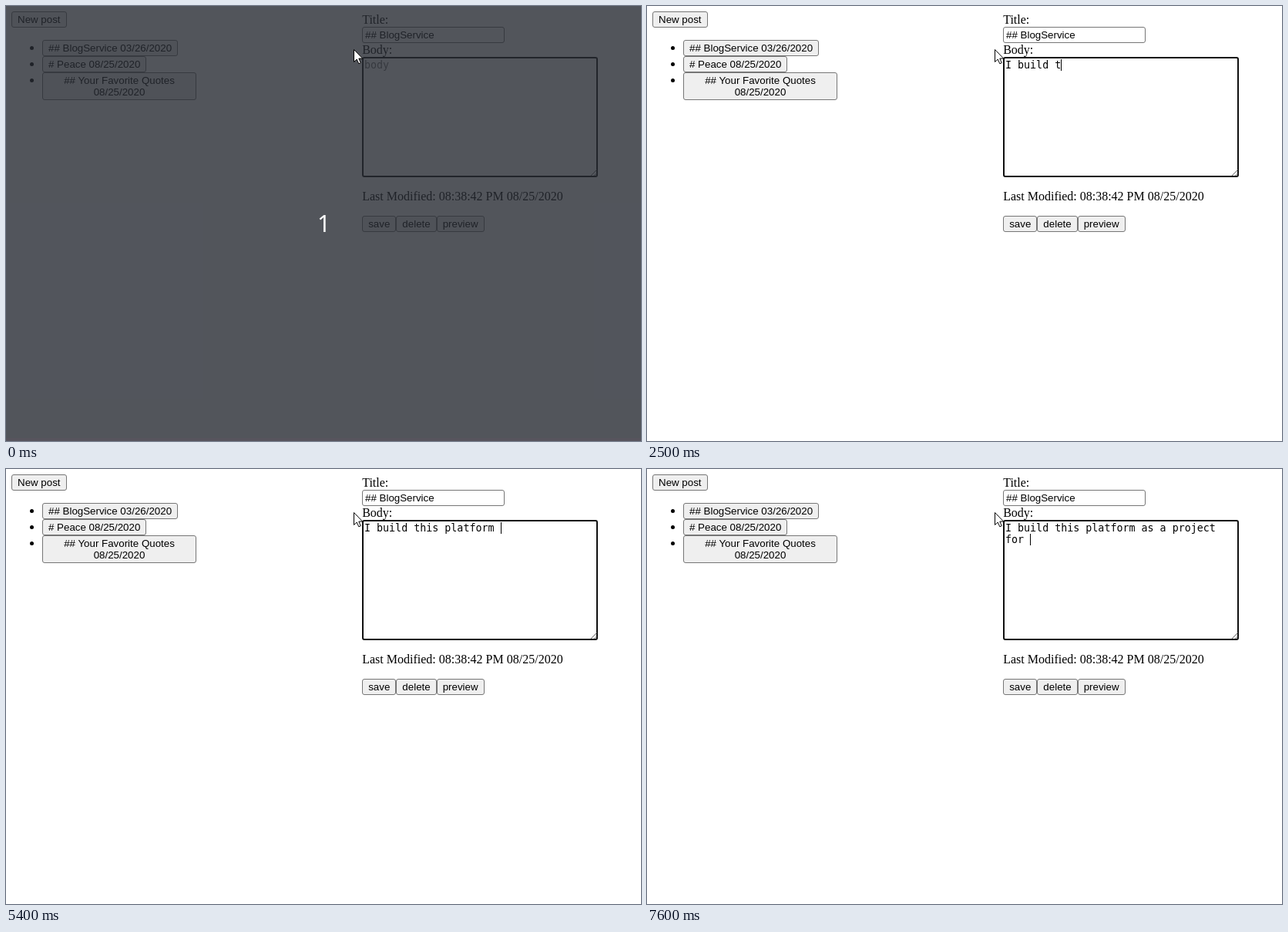
An HTML page that plays this animation: 824 by 564 pixels, repeating every 8000 ms.

```html
<!DOCTYPE html>
<html lang="en">
<head>
<meta charset="utf-8">
<title>Blog editor</title>
<style>
  html, body { margin: 0; width: 824px; height: 564px; overflow: hidden; background: #fff; }
  body { position: relative; font: 16px/18px "Liberation Serif", serif; color: #000; pointer-events: none; }
  .at { position: absolute; white-space: nowrap; }
  .side { left: 462.2px; }
  button, .field { box-sizing: border-box; margin: 0; border: 1px solid #767676; border-radius: 3px;
    font: 13.3333px/15px "Liberation Sans", sans-serif; color: #000; }
  button { padding: 2px 7px; background: #efefef; vertical-align: top; }
  .list { left: 7px; top: 7px; width: 240px; white-space: normal; }
  ul { margin: 16px 0 0; padding: 0 0 0 40px; line-height: 20px; }
  .field { left: 462px; top: 27px; width: 185px; height: 21px; padding: 2px 3px; background: #fff; }
  .area { box-sizing: border-box; left: 462px; top: 66px; width: 306px; height: 156px;
    border: 2px solid #101010; border-radius: 3px; background: #fff; }
  #text { left: 465px; top: 69px; width: 300px; white-space: pre-wrap;
    font: 13.3333px/15px "DejaVu Sans Mono", monospace; }
  #text.hint { color: #757575; }
  #caret { width: 1px; height: 15px; background: #000; }
  #veil { inset: 0; padding-left: 1px; background: rgba(39, 43, 51, .8); color: #fff; text-align: center;
    font: 500 30px/564px "Noto Sans", sans-serif; }
  #veil::after { content: ""; position: absolute; left: 0; right: 0; bottom: 0; height: 4px;
    background: rgba(96, 84, 96, .4); }
  svg { position: absolute; left: 0; top: 0; }
</style>
</head>
<body>
  <div class="at list">
    <button>New post</button>
    <ul>
      <li><button>## BlogService 03/26/2020</button></li>
      <li><button># Peace 08/25/2020</button></li>
      <li><button>## Your Favorite Quotes 08/25/2020</button></li>
    </ul>
  </div>

  <div class="at side" style="top:9px">Title:</div>
  <div class="at field">## BlogService</div>
  <div class="at side" style="top:48px">Body:</div>
  <div class="at area"></div>
  <svg width="824" height="564"><path d="M759 220l7.5-7.5M763.5 220l3-3" stroke="#666" fill="none"/></svg>
  <div class="at" id="text"></div>
  <div class="at" id="caret"></div>
  <div class="at side" style="top:238px">Last Modified: 08:38:42 PM 08/25/2020</div>
  <div class="at side" style="top:272px"><button>save</button><button>delete</button><button>preview</button></div>

  <div class="at" id="veil">1</div>
  <svg width="824" height="564">
    <path d="M451.5 56.500v16l3.700-3.400 2.600 5.700 2.500-1.100-2.500-5.600h4.900z" fill="#fff" stroke="#000"/>
  </svg>

<script>
  const LOOP = 8000, VEIL_END = 500, BLINK = 600, FIRST_BLINK = 100, STEP = 100;
  const CHAR = 8.027, LEFT = 465, TOP = 69, LINE = 15, FIT = 37;

  // Each burst is typed evenly between its first and last key.
  const BURSTS = [
    ["I ", 800, 1000], ["bui", 1400, 1500], ["ld ", 1800, 2000],
    ["this ", 2500, 3000], ["pla", 3100, 3500], ["tfo", 4400, 4500],
    ["rm ", 5100, 5400], ["as a ", 5600, 6100], ["project ", 6300, 7200],
    ["for ", 7300, 7600]
  ];
  const KEYS = BURSTS.flatMap(([part, from, to]) => [...part].map((char, i) => {
    const time = from + (to - from) * i / (part.length - 1);
    return { char, time: Math.floor(time / STEP) * STEP };
  }));

  const [text, caret, veil] = ["text", "caret", "veil"].map(id => document.getElementById(id));
  const show = (el, on) => { el.style.visibility = on ? "visible" : "hidden"; };

  function draw(t) {
    const pressed = KEYS.filter(key => key.time <= t);
    const typed = pressed.map(key => key.char).join("");
    const n = typed.length;
    text.textContent = typed || "body";
    text.classList.toggle("hint", !n);

    const wrapped = n > FIT;
    const lineStart = wrapped ? typed.trimEnd().lastIndexOf(" ") + 1 : 0;
    caret.style.left = Math.round(LEFT + (n - lineStart) * CHAR) + "px";
    caret.style.top = TOP + (wrapped ? LINE : 0) + "px";

    const last = n ? pressed[n - 1].time : FIRST_BLINK;
    const veiled = t < VEIL_END;
    show(veil, veiled);
    show(caret, !veiled && Math.floor((t - last) / BLINK) % 2 === 0);
  }

  function tick() {
    draw(performance.now() % LOOP);
    requestAnimationFrame(tick);
  }
  tick();
</script>
</body>
</html>
```
